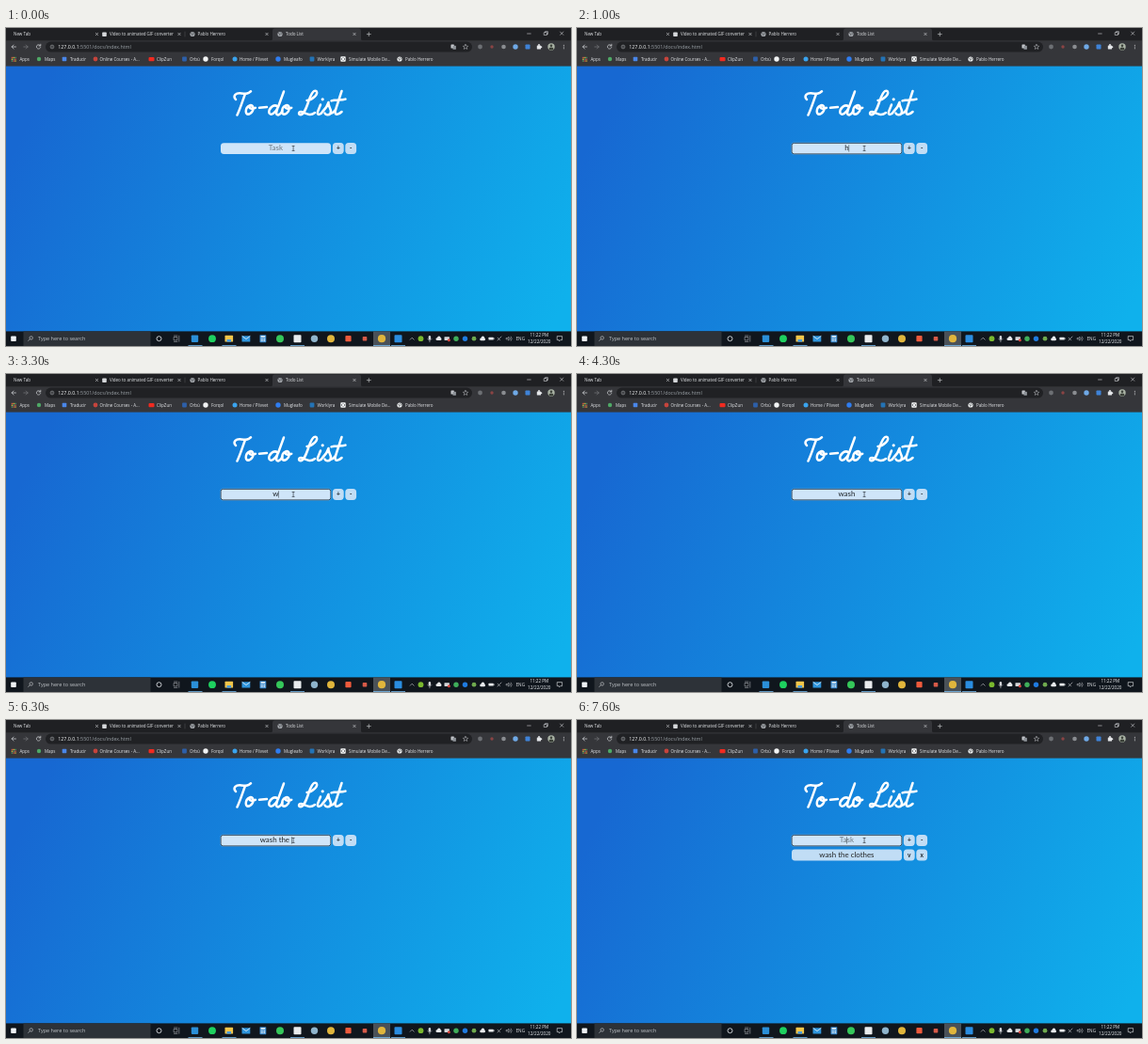
Write an HTML page that moves like this. It is 600 by 338 pixels and loops after 8 s.

```html
<!DOCTYPE html>
<html lang="en">
<head>
<meta charset="utf-8">
<title>Todo List</title>
<style>
  html, body { margin: 0; width: 100%; height: 100%; overflow: hidden; background: #202124; }
  .page { position: absolute; left: 0; top: 40px; width: 600px; height: 283px;
    background: linear-gradient(115deg, #1768d2 7%, #0fb1ec 97%); }
  svg { position: absolute; left: 0; top: 0; display: block; }
  text { white-space: pre; font-family: "Open Sans", "Noto Sans", sans-serif; }
  .field { font-family: Lato, "Open Sans", sans-serif; text-anchor: middle; }
  .line { fill: none; stroke-linecap: round; stroke-linejoin: round; }
</style>
</head>
<body>
<div class="page"></div>
<svg id="stage" width="600" height="338" viewBox="0 0 600 338"></svg>
<script>
const NS = 'http://www.w3.org/2000/svg';
const stage = document.getElementById('stage');

function add(tag, attrs, parent = stage) {
  const el = document.createElementNS(NS, tag);
  for (const k in attrs) el.setAttribute(k, attrs[k]);
  parent.appendChild(el);
  return el;
}
const rect = (x, y, width, height, fill, rx = 0, parent) =>
  add('rect', { x, y, width, height, fill, rx }, parent);
const dot = (cx, cy, r, fill, parent) => add('circle', { cx, cy, r, fill }, parent);
const line = (d, stroke = '#d5d7da', w = 0.7, parent) =>
  add('path', { d, stroke, 'stroke-width': w, class: 'line' }, parent);
function label(x, y, str, size = 4.5, fill = '#e4e6e9', parent, extra = {}) {
  const el = add('text', { x, y, 'font-size': size, fill, ...extra }, parent);
  el.textContent = str;
  return el;
}
const square = (x, y, s, fill) => rect(x - s / 2, y - s / 2, s, s, fill, 0.8);
const cross = (x, y, r, c, w) =>
  line(`M${x - r} ${y - r}l${2 * r} ${2 * r}M${x + r} ${y - r}l${-2 * r} ${2 * r}`, c, w);
function globe(x, y, c = '#a4a8ad') {
  dot(x, y, 2.6, c);
  line(`M${x - 1.6} ${y - 1}l1.4 .8l-.3 1.4M${x + 0.6} ${y - 1.6}l.9 1.2l-.7 1`, '#4a4c50', 0.7);
}

function drawTabs() {
  rect(0, 0, 600, 14, '#1f2023');
  add('path', { d: 'M281 13.5q2 0 2-2V3q0-2.4 2.4-2.4H374.6q2.4 0 2.4 2.4V11.5q0 2 2 2z', fill: '#35363a' });
  label(8, 8.3, 'New Tab');
  square(104.5, 6.8, 4.6, '#d5d7da');
  label(110, 8.3, 'Video to animated GIF converter');
  globe(198, 6.5);
  label(203.5, 8.3, 'Pablo Herrero');
  globe(291, 6.5);
  label(297, 8.3, 'Todo List');
  [96.5, 184, 277, 370].forEach(x => cross(x, 6.5, 1.2, '#d5d7da', 0.6));
  line('M190 4v5', '#55575b', 0.5);
  line('M385.3 4.6v4M383.3 6.6h4', '#d5d7da', 0.6);
  line('M553.6 6h3.6M571.6 4.7h2.8v2.8h-2.8zM572.600 4.7v-1h2.800v2.800h-1', '#e4e6e9', 0.55);
  cross(590.2, 5.7, 1.6, '#e4e6e9', 0.55);
}

function drawToolbar() {
  rect(0, 13.3, 600, 27.3, '#35363a');
  line('M10.5 20h-4.4m2-2l-2 2l2 2');
  line('M18.8 20h4.4m-2-2l2 2l-2 2', '#77797d');
  line('M36.5 18.8a2.2 2.2 0 1 0 .2 1.8M36.8 17.2v1.8h-1.8');
  rect(42, 14.6, 453, 11, '#202124', 5.5);
  add('circle', { cx: 49, cy: 20, r: 1.9, fill: 'none', stroke: '#b4b8bd', 'stroke-width': 0.5 });
  line('M49 19.8v1.1M49 18.9v.1', '#b4b8bd', 0.5);
  const url = label(55.3, 21.9, '127.0.0.1', 5.3, '#f1f3f4');
  label(55.3 + url.getComputedTextLength(), 21.9, ':5501/docs/index.html', 5.3, '#9aa0a6');
  rect(472.5, 17.5, 3.4, 4, '#c4c7cb', 0.5);
  rect(474.5, 18.7, 3.4, 4, '#8f949a', 0.5);
  line('M488 17.4l.8 1.7l1.9 .2l-1.4 1.2l.4 1.900l-1.7-1l-1.7 1l.4-1.900l-1.4-1.200l1.900-.200z', '#c4c7cb', 0.5);
  dot(503.5, 20, 2.4, '#6d7074');
  dot(516, 20, 1.7, '#8a4444');
  dot(528.5, 20, 2.3, '#8a8d91');
  dot(541, 20, 2.7, '#6fa9e6');
  square(554, 20, 5, '#3f83d8');
  rect(563.8, 18.4, 4.2, 4, '#e4e6e9', 0.5);
  dot(566, 18, 1, '#e4e6e9');
  dot(568.3, 20.3, 1, '#e4e6e9');
  dot(579, 20, 3.7, '#a9b2a4');
  add('path', { d: 'M576.4 22.6q0-2.2 2.6-2.2t2.6 2.2q-2.6 2-5.2 0z', fill: '#3a4038' });
  dot(579, 18.8, 1.3, '#3a4038');
  [18.2, 20, 21.8].forEach(y => dot(592.3, y, 0.5, '#e4e6e9'));
}

function drawBookmarks() {
  const y = 33;
  const hues = ['#e2574c', '#e9b83b', '#53a867'];
  for (let i = 0; i < 9; i++) rect(5.8 + i % 3 * 1.8, 30.8 + (i / 3 | 0) * 1.8, 1.3, 1.3, hues[(i + (i / 3 | 0)) % 3]);
  dot(35, y, 2.2, '#4fa866');
  square(62, y, 4.6, '#4a86e8');
  dot(95, y, 2.4, '#c5443c');
  rect(151.5, 31, 6, 4.2, '#f02a20', 1);
  square(189.5, y, 4.8, '#2d5fa8');
  dot(212, y, 2.7, '#f1f3f4');
  dot(243, y, 2.5, '#3aa3ee');
  dot(289, y, 2.7, '#2f7df0');
  square(325, y, 4.8, '#2373b5');
  square(358, y, 5.4, '#f1f3f4');
  line('M357.2 31.8l-1.2 1.2l1.2 1.2M358.8 31.8l1.2 1.2l-1.2 1.2', '#35363a', 0.6);
  globe(418, y, '#f1f3f4');
  [[14.5, 'Apps'], [41, 'Maps'], [68, 'Traducir'], [99.5, 'Online Courses - A...'],
   [160, 'ClipZun'], [195, 'Orbú'], [218, 'Forqol'], [248, 'Home / Plivvet'], [295, 'Mugleafo'],
   [330.5, 'Worklyra'], [364, 'Simulate Mobile De...'], [424, 'Pablo Herrero']]
    .forEach(([x, str]) => label(x, 34.6, str));
}

function drawTaskbar() {
  rect(0, 322.4, 600, 15.6, '#10161d');
  square(8, 330.2, 5.6, '#eef2f5');
  rect(18.5, 322.4, 135, 15.6, '#2d3238');
  add('circle', { cx: 26.7, cy: 329.4, r: 1.7, fill: 'none', stroke: '#d5d7da', 'stroke-width': 0.6 });
  line('M25.4 330.7l-1.7 1.7', '#d5d7da', 0.6);
  label(34, 332.1, 'Type here to search', 5.5, '#c0c4c8');
  add('circle', { cx: 162.5, cy: 330.2, r: 2.5, fill: 'none', stroke: '#eef2f5', 'stroke-width': 0.8 });
  line('M178.5 328.5h3.4v3.4h-3.4zM178.5 327h3.4M178.5 333.400h3.400M183.8 327.2v6', '#c4c7cb', 0.5);
  rect(390, 322.4, 18, 15.6, '#4a5158');
  square(200.5, 330.2, 7.4, '#2b8fd8');
  dot(219, 330.2, 3.9, '#1ed05f');
  rect(232.5, 326.8, 8.6, 6.8, '#f3c64a', 0.6);
  rect(234.5, 331, 4.6, 2.6, '#4a9ee0');
  rect(250.5, 327.2, 8.8, 6.4, '#2f95dc', 0.4);
  line('M251 327.6l4 3l4-3', '#eaf4fb', 0.8);
  rect(269.5, 326.2, 6.8, 8, '#3a8bd0', 0.6);
  rect(270.6, 327.2, 4.6, 1.7, '#e3eef6');
  for (let i = 0; i < 6; i++) rect(270.6 + i % 3 * 1.7, 330 + (i / 3 | 0) * 1.8, 1.2, 1.2, '#e3eef6');
  dot(291, 330.2, 4, '#35c75a');
  square(309.5, 330.2, 8, '#e8ebed');
  dot(327.5, 330.2, 3.7, '#8fb4cc');
  dot(345, 330.2, 4, '#e0b53c');
  square(363.5, 330.2, 6.2, '#ee5a3c');
  square(381, 330.2, 4.6, '#d75a48');
  dot(399, 330.2, 4.1, '#e0b53c');
  square(416.5, 330.2, 8, '#2a8de0');
  [[193.5, 15], [229.5, 15], [302, 15], [390, 18], [409, 15]]
    .forEach(([x, w]) => rect(x, 337.2, w, 0.8, '#76b9ed'));

  line('M429.2 331.2l2-2l2 2', '#d5d7da', 0.6);
  dot(440.5, 330.2, 2.9, '#7ab82e');
  rect(448.7, 327, 2.4, 4.4, '#d5d7da', 1.2);
  line('M447.8 330.5q2.1 3.5 4.2 0M449.9 332.3v1.5', '#d5d7da', 0.5);
  rect(456.5, 329.2, 6, 2.9, '#e8ebed', 1.45);
  dot(459.8, 329.2, 1.7, '#e8ebed');
  rect(465.5, 328.2, 5.4, 3.8, '#d5d7da', 0.4);
  dot(470.4, 331.800, 1.5, '#d8463e');
  dot(478, 330.2, 2.7, '#3fae5a');
  dot(487.5, 330.2, 2.7, '#1f7be0');
  dot(497, 330.2, 2.4, '#6fa94e');
  rect(503.2, 329.5, 5.8, 2.8, '#e8ebed', 1.4);
  dot(506.4, 329.3, 1.7, '#e8ebed');
  rect(512.5, 328.8, 5.2, 2.8, '#e8ebed', 0.4);
  line('M518.2 329.7v1', '#e8ebed', 0.6);
  line('M522 332l4-4M522.2 329.2l2.4 2.6', '#d5d7da', 0.6);
  line('M531.5 329.5h1l1.3-1.2v3.8l-1.3-1.2h-1zM535 329q1 1.2 0 2.4M536.3 328q2 2.2 0 4.4', '#d5d7da', 0.5);
  label(541.5, 331.9, 'ENG', 4.7);
  const centred = { 'text-anchor': 'middle' };
  label(566.3, 327.9, '11:22 PM', 4.6, '#eef2f5', stage, centred);
  label(566.3, 335.1, '12/22/2020', 4.6, '#eef2f5', stage, centred);
  line('M585.6 327.6h5v4h-1.900l-1.100 1.300l-.4-1.300h-1.600z', '#e8ebed', 0.6);
}

function drawTitle() {
  const g = add('g', { role: 'img', 'aria-label': 'To-do List' });
  const o = (x, y) => `M${x} ${y}c-4 0-5.500 5.500-4.200 8.200c2 2.600 7-1 7.200-5c0-3.800-3.200-4.600-4.600-2.400c.6 2.800 4.200 3.400 7 1.400`;
  [
    'M244 76C240.500 72 244 68.600 250 69.400S257 69.800 260 67.200M254 70C251 78 249 85 245.500 92.500',
    o(259.500, 82.500),
    'M269 84.800L277 84',
    'M288.500 83.500C284 80 278.500 86 279.500 90.500C281.500 94 287 89 289 84L295 67.500M289 83.500C287 89 286 92.500 289 92.400C291 92 292.500 90 293.500 88',
    o(297.800, 82.500),
    'M319.500 77C326 76.500 332 70 329.500 67C326.500 65 323 72 321 79C318.500 86 316.500 91.500 313 92.300C310 92.300 310.500 88 314.500 89.200C319 91 323 94 328 90',
    'M334 81.500L331 89C330 93.500 334 92.500 337 88',
    'M337 88C340 85 341.500 82 342.500 79C341.500 83.500 347 87 344.500 91C342.500 93 339.500 92.500 338.500 90.500M344.500 91C347 90.500 348.500 89 350 87',
    'M356.500 67L349.800 87.500C348.500 93 352.500 93 356.500 89M345.500 77.400C350 75.600 356 77.400 360.500 75.600'
  ].forEach(d => line(d, '#fff', 2.5, g));
  dot(336.2, 75.8, 1.6, '#fff', g);
}

function button(x, y, str, parent) {
  rect(x, y, 11.8, 11.8, '#c1ddf5', 3.6, parent);
  label(x + 5.9, y + 8.1, str, 6.6, '#20262c', parent, { class: 'field', 'font-weight': 700 });
}

drawTabs();
drawToolbar();
drawBookmarks();
drawTaskbar();
drawTitle();

// Task entry
const MID = 286.4;
rect(228, 122.2, 117, 11.8, '#cfe5f9', 3.4);
const ring = add('g', {});
const outline = (grow, stroke, w) => add('rect', {
  x: 228.2 - grow, y: 122.4 - grow, width: 116.6 + 2 * grow, height: 11.4 + 2 * grow,
  rx: 2.2 + grow, fill: 'none', stroke, 'stroke-width': w
}, ring);
outline(0.5, 'rgba(230,242,252,.4)', 0.7);
outline(0, '#1a2632', 0.7);
button(346.9, 122.1, '+');
button(360.3, 122.1, '-');
const entry = label(MID, 130.4, '', 7.9, '#222', stage, { class: 'field' });
const caret = rect(0, 124.2, 0.5, 7.4, '#2a3238');

// Added task
const row = add('g', {});
rect(228, 137.6, 117, 11.8, '#c1ddf5', 3.4, row);
label(MID, 145.7, 'wash the clothes', 7.9, '#222', row, { class: 'field' });
button(346.9, 137.6, 'v', row);
button(360.3, 137.6, 'x', row);

// Suggestions
const menu = add('g', {});
rect(227.4, 134, 118.2, 90.8, 'rgba(0,0,0,.25)', 1, menu);
rect(228, 134, 117, 90, '#29292c', 1, menu);
['123', 'limpiar', '3', 'as', 'ca', '3123'].forEach((s, i) =>
  label(232, 146 + i * 14.05, s, 5, '#f4f4f4', menu, { 'font-weight': 600 }));

// Pointer
line('M304 125.4h2.2M305.1 125.4v5M304 130.4h2.2', '#222a33', 0.6);

const LOOP = 8000;
const typed = [
  [100, ''], [1000, 'h'], [1600, 'he'], [1900, 'hel'], [2300, 'he'], [2800, 'h'], [2900, ''],
  [3300, 'w'], [3400, 'wa'], [3600, 'was'], [3800, 'wash'], [4900, 'wash '], [5000, 'wash t'],
  [5300, 'wash th'], [5600, 'wash the'], [6000, 'wash the '], [6500, 'wash the c'],
  [6700, 'wash the cl'], [6800, 'wash the clo'], [7000, 'wash the clot'], [7100, 'wash the cloth'],
  [7200, 'wash the clothe'], [7300, 'wash the clothes'], [7500, '']
];
const show = (el, on) => el.setAttribute('visibility', on ? 'visible' : 'hidden');

function render(t) {
  const [start, str] = typed.filter(s => s[0] <= t).pop() || [0, ''];
  const focused = t >= 100;
  entry.textContent = str || 'Task';
  entry.setAttribute('fill', str ? '#1d2328' : '#6d7880');
  const half = str ? entry.getComputedTextLength() / 2 : 0;
  caret.setAttribute('x', MID + half);
  show(caret, focused && (t - start) % 1000 < 500);
  show(ring, focused);
  show(menu, t >= 100 && t < 1000);
  show(row, t >= 7500);
}
function tick() {
  render(performance.now() % LOOP);
  requestAnimationFrame(tick);
}
render(0);
tick();
</script>
</body>
</html>
```
